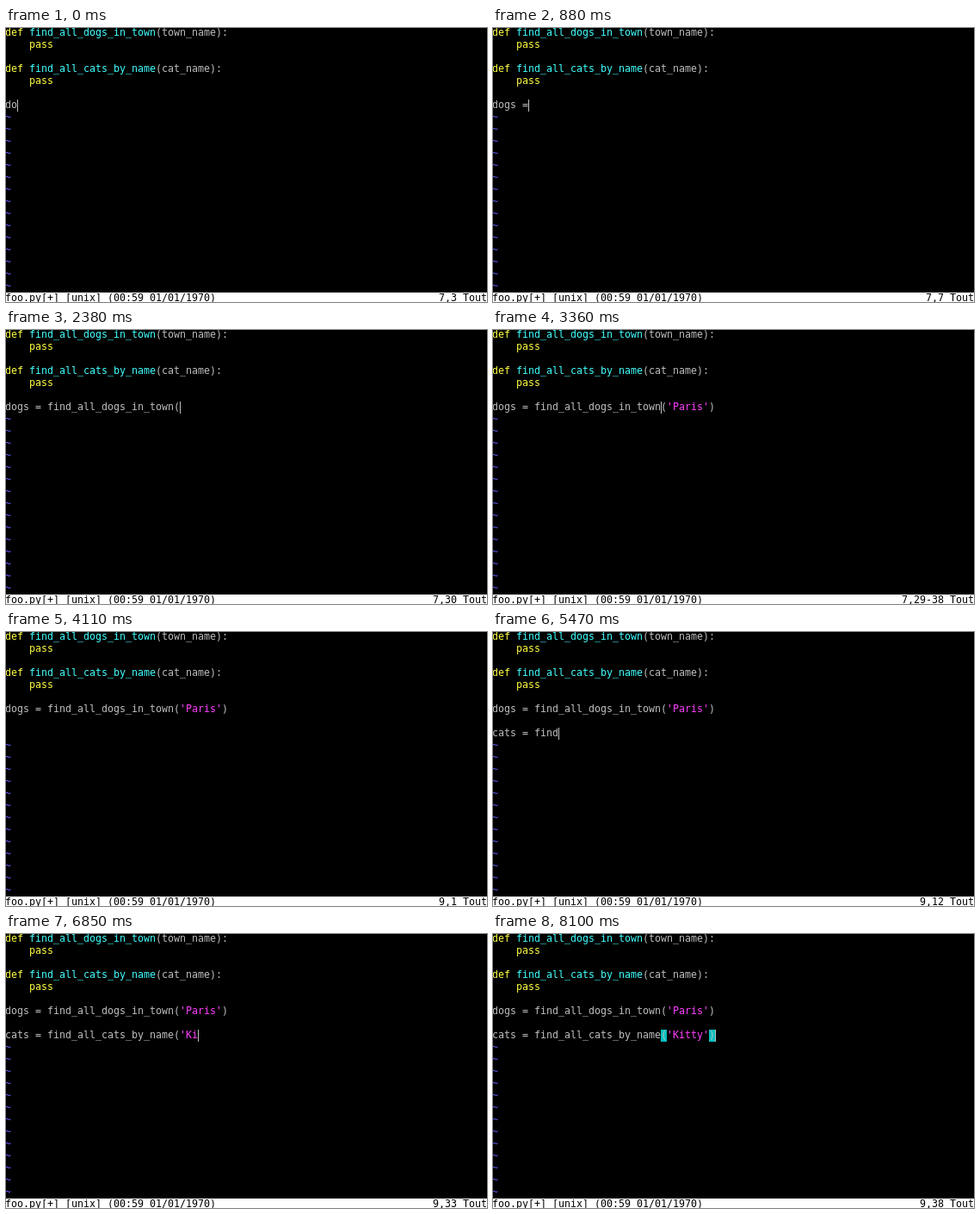
These frames come from a looping animation (559x318 px, 8.33 s). An HTML page with a canvas:

```html
<!DOCTYPE html>
<html>
<head>
<meta charset="utf-8">
<style>
html, body { margin: 0; width: 559px; height: 318px; overflow: hidden; background: #000; }
canvas { display: block; }
</style>
</head>
<body>
<canvas id="term" width="559" height="318"></canvas>
<script>
const ctx = document.getElementById('term').getContext('2d');
const LOOP = 8330, CELL_W = 7, CELL_H = 14, COLS = 80, STATUS_ROW = 22;
const GREY = '#bfbfbf', YELLOW = '#ffff40', CYAN = '#40ffff', BLUE = '#6060ff',
      PINK = '#ff40ff', PURPLE = '#bf00bf', TEAL = '#00bfbf', DIM = '#404040';
const DOGS = 'find_all_dogs_in_town', CATS = 'find_all_cats_by_name';
const MENU_COL = 6, WORD_COL = 7, PAREN_COL = 28;

// Each step: start time, text of the line being typed, optional extra state.
const dogLine = `dogs = ${DOGS}`, catLine = `cats = ${CATS}`;
const dogSteps = [
  [0, 'do'], [130, 'do', { blink: true }], [380, 'dog'], [510, 'dogs'], [630, 'dogs '],
  [880, 'dogs ='], [1010, 'dogs = '], [1260, 'dogs = f'], [1400, 'dogs = fi'],
  [1520, 'dogs = fin'], [1640, 'dogs = find'],
  [1890, catLine, { menu: [DOGS, CATS], pick: 1 }],
  [2010, dogLine, { menu: [DOGS, CATS], pick: 0 }],
  [2380, dogLine + '('], [2510, dogLine + "('"],
  [2990, dogLine + "('Par"], [3110, dogLine + "('Paris"],
  [3360, dogLine + "('Paris')", { jump: true }],
  [3730, dogLine + "('Paris')", { match: true }]
];
const catSteps = [
  [4110, ''], [4220, 'c'], [4360, 'cats'], [4860, 'cats ='], [4980, 'cats = '],
  [5350, 'cats = fi'], [5470, 'cats = find'],
  [5620, dogLine.replace('dogs', 'cats'), { menu: [CATS, DOGS], pick: 1 }],
  [5970, catLine, { menu: [CATS, DOGS], pick: 0 }],
  [6230, catLine + '('], [6480, catLine + "('"],
  [6850, catLine + "('Ki"], [6980, catLine + "('Kitt"], [7230, catLine + "('Kitty'"],
  [7600, catLine + "('Kitty')", { jump: true }],
  [8100, catLine + "('Kitty')", { match: true }]
];

const cellX = col => col * CELL_W - 1;
const cellY = row => row * CELL_H - 1;

function fillCells(row, col, count, color) {
  ctx.fillStyle = color;
  ctx.fillRect(cellX(col), cellY(row), count * CELL_W, CELL_H);
}

function write(row, col, text, color) {
  ctx.fillStyle = color;
  for (const ch of text) ctx.fillText(ch, cellX(col++), cellY(row) + 10);
  return col;
}

function writeDef(row, name, args) {
  write(row, 0, 'def', YELLOW);
  write(row, write(row, 4, name, CYAN), `(${args}):`, GREY);
  write(row + 1, 4, 'pass', YELLOW);
}

function writeCode(row, text) {
  let col = 0;
  for (const part of text.split(/('[^']*'?)/))
    col = write(row, col, part, part[0] === "'" ? PINK : GREY);
}

function drawMenu(row, items, pick) {
  items.forEach((item, i) => {
    const chosen = i === pick;
    fillCells(row + i, MENU_COL, item.length + 2, chosen ? '#000' : PURPLE);
    write(row + i, WORD_COL, item, chosen ? DIM : '#000');
  });
}

function drawStatus(line, column) {
  ctx.fillStyle = '#fff';
  ctx.fillRect(0, cellY(STATUS_ROW), 559, CELL_H);
  write(STATUS_ROW, 0, 'foo.py[+] [unix] (00:59 01/01/1970)', '#000');
  const ruler = `${line},${column} Tout`;
  write(STATUS_ROW, COLS - ruler.length, ruler, '#000');
}

function draw(time) {
  const second = time >= catSteps[0][0];
  const row = second ? 8 : 6;
  const [, text, extra = {}] = (second ? catSteps : dogSteps).filter(s => s[0] <= time).pop();
  const { menu, pick, jump, match, blink } = extra;

  ctx.fillStyle = '#000';
  ctx.fillRect(0, 0, 559, 318);
  ctx.font = '11.63px "DejaVu Sans Mono", monospace';
  ctx.textBaseline = 'alphabetic';

  writeDef(0, DOGS, 'town_name');
  writeDef(3, CATS, 'cat_name');
  for (let r = row + 1; r < STATUS_ROW; r++) write(r, 0, '~', BLUE);
  if (second) writeCode(6, dogLine + "('Paris')");
  if (match) {
    fillCells(row, PAREN_COL, 1, TEAL);
    fillCells(row, text.length - 1, 1, TEAL);
  }
  writeCode(row, text);
  if (menu) drawMenu(row + 1, menu, pick);

  const end = text.length + 1;
  drawStatus(row + 1, menu ? 12 : jump ? `${PAREN_COL + 1}-${end}` : end);

  if (!blink) {
    ctx.fillStyle = GREY;
    ctx.fillRect(cellX(jump ? PAREN_COL : text.length), cellY(row), 1, CELL_H);
  }
}

const start = performance.now();
function tick() {
  draw((performance.now() - start) % LOOP);
  requestAnimationFrame(tick);
}
tick();
</script>
</body>
</html>
```
